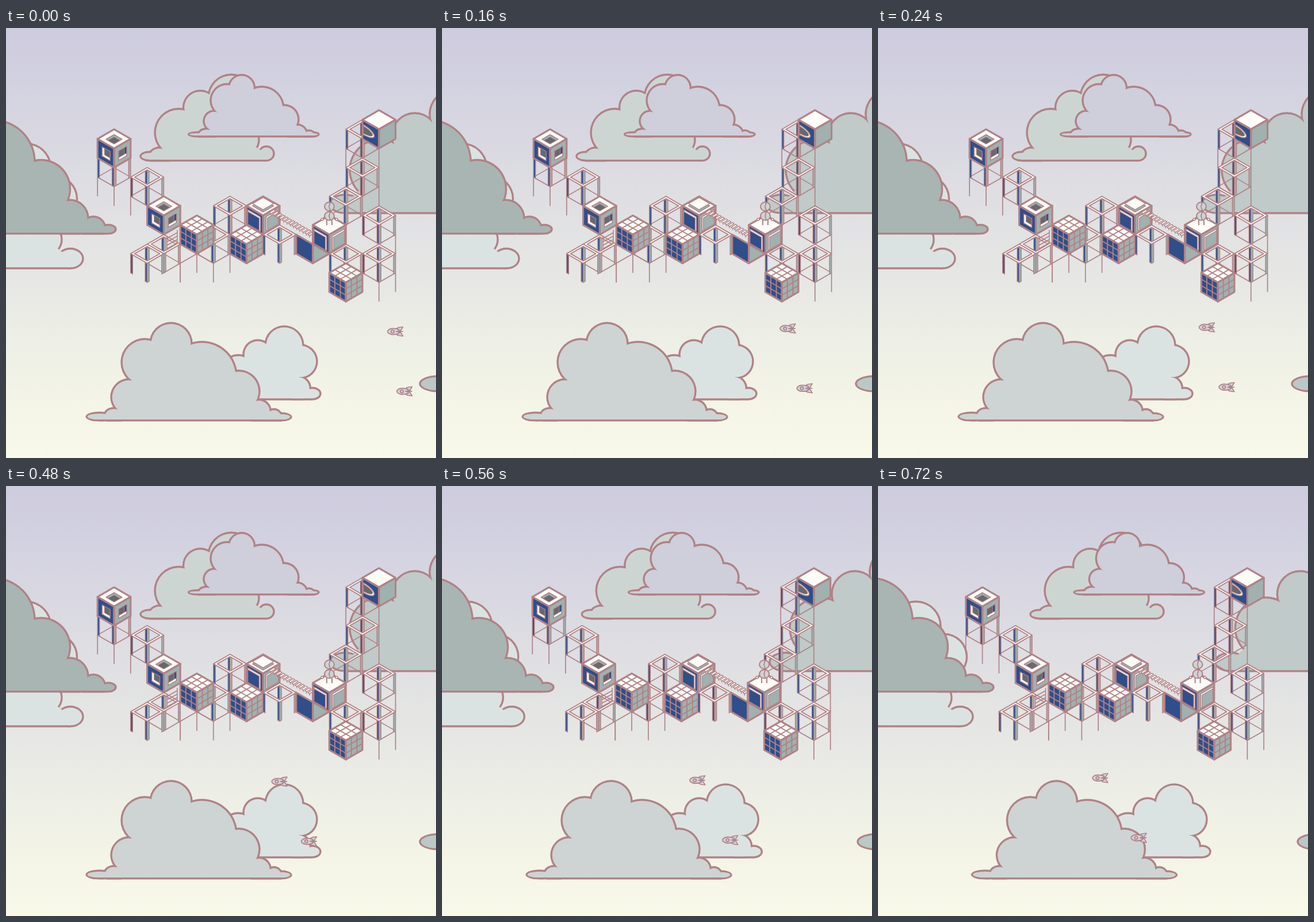
An HTML page with a canvas that plays this animation: 748x748 px, repeating every 0.8 s.

```html
<!DOCTYPE html>
<html lang="en">
<head>
<meta charset="utf-8">
<title>Sky blocks</title>
<style>
  html, body { margin: 0; width: 100%; height: 100%; overflow: hidden; }
  canvas { display: block; width: 748px; height: 748px; }
</style>
</head>
<body>
<canvas id="stage" width="748" height="748"></canvas>
<script>
const ctx = document.getElementById('stage').getContext('2d');
const LINE = '#b08286', BLUE = '#2f4e8a', SAGE = '#a0b1af', WHITE = '#fffdf8', DARK = '#68696c';

// Isometric cell: half width, half depth, height
const W = 28.8, H = 16.65, Z = 2 * H;
const BEAM = 0.12;

const STEP = 80, STEPS = 10;

const sky = ctx.createLinearGradient(0, 0, 0, 748);
['#cdcbde', '#d6d5e1', '#dfdfe3', '#e7e8e4', '#f1f2e6', '#f9f9e9']
  .forEach((color, i) => sky.addColorStop(i / 5, color));

function paint(fill, width) {
  if (fill) { ctx.fillStyle = fill; ctx.fill('evenodd'); }
  if (width) { ctx.lineWidth = width; ctx.stroke(); }
}

function trace(points, close) {
  points.forEach(([x, y], i) => i ? ctx.lineTo(x, y) : ctx.moveTo(x, y));
  if (close) ctx.closePath();
}

function shape(points, fill, width) {
  ctx.beginPath();
  trace(points, true);
  paint(fill, width);
}

function line(points, width = 1.7) {
  ctx.beginPath();
  trace(points, false);
  paint(null, width);
}

function ellipse(x, y, rx, ry, fill, width) {
  ctx.beginPath();
  ctx.ellipse(x, y, rx, ry, 0, 0, 2 * Math.PI);
  paint(fill, width);
}

// A cloud is the union of puffs [x, y, ry, rx = ry], cut flat at its base
function cloud(shift, color, base, puffs) {
  const first = puffs[0], last = puffs[puffs.length - 1];
  for (const [fill, grow] of [[LINE, 1.7], [color, -1.7]]) {
    ctx.save();
    ctx.translate(shift, 0);
    ctx.beginPath();
    ctx.rect(-200, 0, 1200, base + grow);
    ctx.clip();
    shape([...puffs, [last[0], base + 2], [first[0], base + 2]], fill);
    for (const [x, y, ry, rx = ry] of puffs) ellipse(x, y, rx + grow, ry + grow, fill);
    ctx.restore();
  }
}

function clouds(pan) {
  const near = 10 * pan, middle = 23.4 * pan, far = 31 * pan;
  cloud(far, '#cdd5d3', 230.8, [[249, 223, 7.5, 15], [267, 224, 16, 19], [300.5, 182, 41.5],
    [338, 138.5, 29.5], [392, 121, 40], [415, 195, 25], [453, 218.4, 12.4, 13]]);
  cloud(middle, '#cfcedb', 188.8, [[334, 185, 3.8, 16.5], [349, 186, 11, 15], [362, 162, 18],
    [384.5, 126, 28.5], [410, 104, 22.5], [445, 140, 38], [484, 159, 25], [507, 185, 17],
    [527, 186, 8, 10], [533, 185, 3.8, 11]]);
  cloud(middle, '#bfcac9', 322, [[590, 306, 16, 27], [651, 247, 53], [711, 188, 40], [780, 150, 43]]);
  cloud(far, '#dbe3e2', 418, [[-40, 330, 88], [35, 244, 43], [84, 297, 39.5], [70, 368, 27], [112, 401, 17.2, 22]]);
  cloud(near, '#a9b5b3', 357.8, [[-23, 233, 73], [61, 280, 50.5], [111, 331, 32], [152, 349, 21], [178, 350, 7.8, 13]]);
  cloud(far, '#dbe3e2', 646, [[404, 600, 31], [438, 568, 25], [484, 552, 33], [512, 580, 29],
    [508, 627, 21.5], [533, 636, 10, 14]]);
  cloud(middle, '#ced4d3', 682.7, [[163, 676, 7, 23], [188, 674, 13, 17], [214, 642, 31],
    [241.5, 581.5, 40.5], [287, 549, 36], [341, 606, 60], [405, 632, 36], [440, 667, 20.5],
    [466, 677, 14], [478, 676.5, 6.5, 18]]);
  cloud(near, '#bcc8c7', 632, [[752, 618.8, 13.2, 32]]);
}

// Columns and rows of the isometric lattice, as the rear top corner of a cell
const cell = (column, row) => [188 + column * W, 176.2 + row * H];

// Each face maps unit (u, v) onto the cell whose rear top corner is (x, y)
const faces = {
  top: (x, y) => (u, v) => [x + (u - v) * W, y + (u + v) * H],
  left: (x, y) => (u, v) => [x + (u - 1) * W, y + H + u * H + v * Z],
  right: (x, y) => (u, v) => [x + u * W, y + 2 * H - u * H + v * Z]
};

const rect = (at, u0, v0, u1, v1) => [at(u0, v0), at(u1, v0), at(u1, v1), at(u0, v1)];

function panel(face, x, y, box, fill, width = 1.5) {
  shape(rect(faces[face](x, y), ...box), fill, width);
}

function cube(column, row, detail, lid = WHITE) {
  const [x, y] = cell(column, row), colors = { top: lid, left: BLUE, right: SAGE };
  for (const face in faces) panel(face, x, y, [0, 0, 1, 1], colors[face], 0);
  if (detail) detail(x, y);
  for (const face in faces) if (colors[face]) panel(face, x, y, [0, 0, 1, 1], null, 3.1);
}

function grid(x, y) {
  for (const face in faces) {
    const at = faces[face](x, y);
    for (const k of [1 / 3, 2 / 3]) {
      line([at(k, 0), at(k, 1)], 1.9);
      line([at(0, k), at(1, k)], 1.9);
    }
  }
}

function windows(x, y) {
  const lo = 0.28, hi = 0.76, mid = 0.62;
  panel('top', x, y, [lo, lo, hi, hi], SAGE);
  panel('top', x, y, [0.4, 0.4, hi, hi], DARK, 0.8);
  panel('left', x, y, [lo, lo, hi, hi], WHITE);
  panel('left', x, y, [0.42, lo, hi, mid], DARK, 1);
  panel('right', x, y, [lo, lo, hi, hi], WHITE);
  panel('right', x, y, [lo, lo, mid, mid], DARK, 1);
  panel('right', x, y, [mid, lo, hi, mid], BLUE, 0.8);
}

function hut(x, y) {
  panel('left', x, y, [0.08, 0.16, 0.84, 0.92], WHITE);
  panel('left', x, y, [0.08, 0.26, 0.76, 0.92], BLUE, 1.2);
  panel('right', x, y, [0.18, 0.16, 0.92, 0.92], WHITE);
  panel('right', x, y, [0.26, 0.26, 0.92, 0.92], SAGE, 1.2);
}

function tower(x, y) {
  hut(x, y);
  panel('top', x, y, [0.18, 0.18, 0.82, 0.82], SAGE);
  panel('top', x, y - 4, [0.18, 0.18, 0.82, 0.82], WHITE);
}

function arch(x, y) {
  const at = faces.left(x, y);
  const curve = (reach, half) => Array.from({ length: 15 }, (_, i) => {
    const a = (i / 14 - 0.5) * Math.PI;
    return at(0.06 + reach * Math.cos(a), 0.49 + half * Math.sin(a));
  });
  shape(curve(0.66, 0.26), WHITE, 1.6);
  shape(curve(0.56, 0.19), DARK, 1);
}

// legs names the lower corners (l, c, r, b) whose posts run on for one more cell
function frame(column, row, legs = '', open = false) {
  const [x, y] = cell(column, row);
  const top = faces.top(x, y), left = faces.left(x, y), right = faces.right(x, y);
  const foot = { l: left(0, 1), c: left(1, 1), r: right(1, 1), b: [x, y + Z] };
  if (!open) {
    line([foot.l, foot.b, foot.r], 1.5);
    line([foot.l, foot.c, foot.r]);
  }
  for (const key of legs) line([foot[key], [foot[key][0], foot[key][1] + Z]]);

  for (const [side, color] of [[-1, BLUE], [1, SAGE]]) {
    const edge = x + side * BEAM * W;
    shape([[x, y + 5], [edge, y + 7], [edge, y + Z - 4], [x, y + Z - 2]], color, 1.1);
  }
  for (const [face, color] of [['left', BLUE], ['right', SAGE]]) {
    panel(face, x, y, [0, 0, BEAM, 1], color);
    panel(face, x, y, [1 - BEAM, 0, 1, 1], color);
  }
  ctx.beginPath();
  trace(rect(top, 0, 0, 1, 1), true);
  trace(rect(top, BEAM, BEAM, 1 - BEAM, 1 - BEAM), true);
  paint(WHITE, 1.8);
}

function stairs() {
  for (let i = 0; i < 13; i++) {
    const x = 458 + i * 5.6, y = 321 + i * 3.2;
    shape([[x, y], [x + 8, y - 5], [x + 11, y - 3], [x + 3, y + 2]], WHITE, 1.4);
    line([[x + 3, y + 2], [x + 3, y + 5]], 1.4);
  }
}

function ladder() {
  for (const x of [280, 298]) line([[x, 518 - x * 0.56], [x, 543 - x * 0.56]], 1.5);
  for (let y = 366; y < 390; y += 6) line([[280, y], [298, y - 10]], 1.6);
}

function figure() {
  for (const side of [-1, 1]) {
    const x = 562.5 + side * 4.5;
    line([[x, 333], [x, 343]], 2);
    line([[x + side * 3, 328], [x + side * 8, 333]], 1.8);
    ellipse(x + side * 8, 333, 2, 2, WHITE, 1.4);
  }
  for (const y of [327, 310.5]) {
    ellipse(562.5, y, 8.4, 7.6, '#cfd3d4', 2);
    line([[564, y - 7], [562, y], [564, y + 7]], 1.7);
  }
}

function structure() {
  frame(0, 2, 'lc');
  cube(0, 0, windows);
  frame(2, 4, 'l');
  frame(3, 11, 'r');
  ladder();
  frame(2, 12, '', true);
  cube(3, 7, windows);

  frame(7, 7);
  frame(6, 10, 'cr');
  const [x, y] = cell(5, 13);
  line([[x - W, y + H + Z], [x - W, y + H], [x, y], [x + W, y + H]]);
  line([[x, y], [x, y + Z]]);
  cube(5, 9, grid);

  cube(9, 7, tower);
  cube(8, 10, grid);
  frame(10, 10, '', true);
  cube(12, 10, null, null);
  stairs();

  frame(15, -1, 'lcr');
  frame(15, 3, 'r');
  frame(14, 6);
  frame(16, 8, 'r');
  frame(16, 12, 'cr');
  frame(14, 12);
  cube(13, 9, hut);
  cube(14, 14, grid);
  cube(16, -2, arch);
  figure();
}

function rocket(x, y) {
  const body = '#d6d2da';
  ctx.save();
  ctx.translate(x, y);
  for (const side of [-1, 1]) {
    shape([[14, 4 * side], [19, 7 * side], [27, 8 * side], [24, 3 * side], [20, 0]], body, 1.6);
  }
  ctx.beginPath();
  ctx.moveTo(0, 0);
  ctx.bezierCurveTo(3, -7, 13, -6, 20, -3.5);
  ctx.lineTo(20, 3.5);
  ctx.bezierCurveTo(13, 6, 3, 7, 0, 0);
  paint(body, 1.8);
  ellipse(9, 0, 2.7, 2.7, '#c3cad8', 1.6);
  shape([[15, 0], [20, -1.6], [27, 0], [20, 1.6]], '#8d93b5', 1.1);
  ctx.restore();
}

// The scene rests, then pans over the last three steps with a slack middle
function panAt(step) {
  const n = Math.max(0, step - 6);
  return 0.3 * n - 0.1 * n * (n - 1) + 0.1167 * n * (n - 1) * (n - 2);
}

// A quick start, then nearly even flight with a slight sway
function flightAt(step) {
  return step ? 17 + 30.4 * step - 3 * Math.sin((step - 1) * Math.PI / 4) : 0;
}

function draw(step) {
  const pan = panAt(step), flown = flightAt(step), rise = flown * 0.069;
  ctx.fillStyle = sky;
  ctx.fillRect(0, 0, 748, 748);
  ctx.strokeStyle = LINE;
  ctx.lineJoin = 'round';

  clouds(pan);
  ctx.save();
  ctx.translate(-6.4 * pan, 0);
  structure();
  ctx.restore();

  rocket(663.5 - flown, 528 - rise);
  rocket(679.5 - flown * 0.824, 632 - rise);
}

const start = performance.now();
function tick() {
  const elapsed = Math.max(0, performance.now() - start);
  draw(Math.floor(elapsed / STEP) % STEPS);
  requestAnimationFrame(tick);
}
tick();
</script>
</body>
</html>
```
